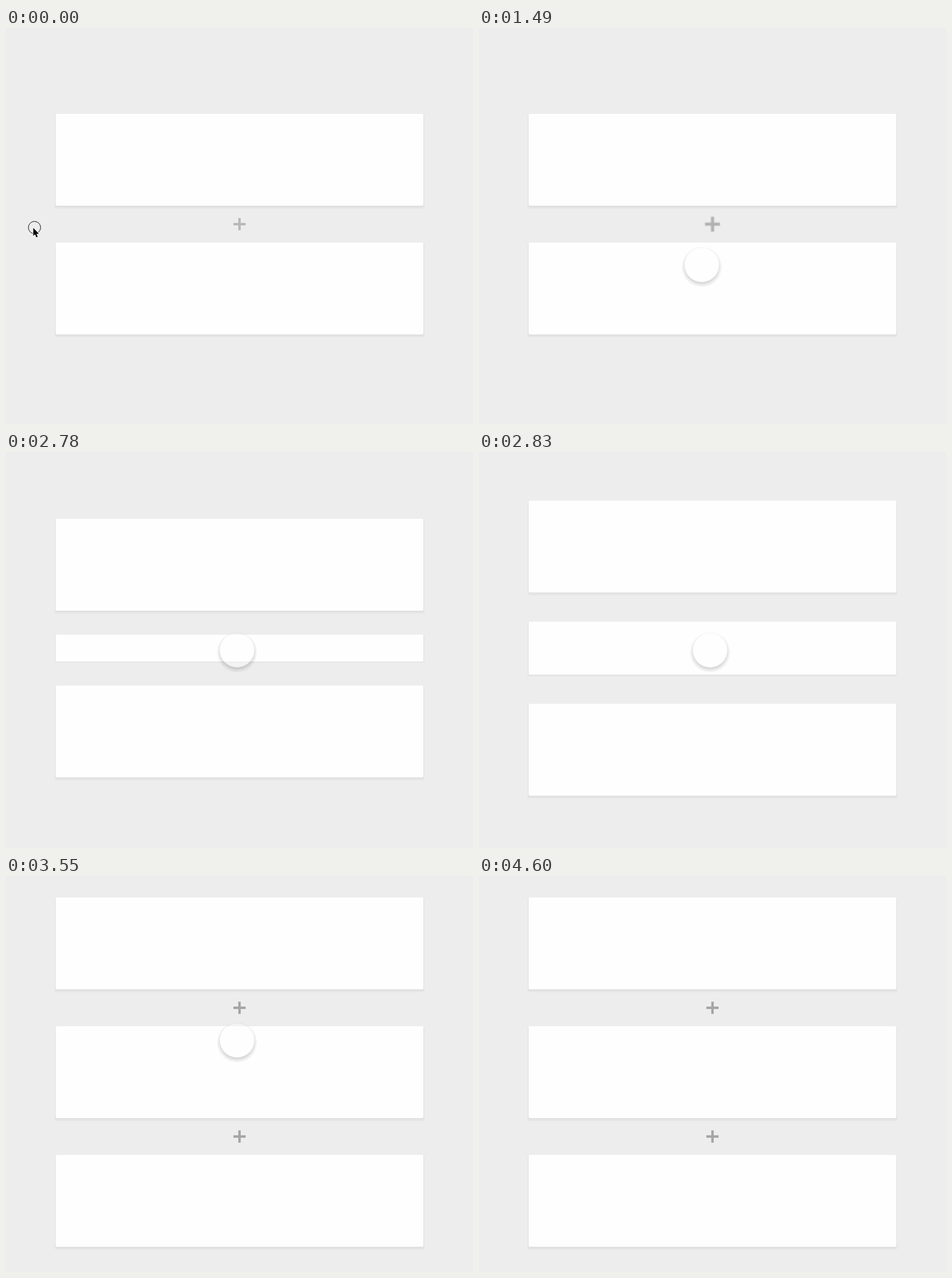
Recreate the animation shown at these times as an HTML page. Size 762x646 px, loop 5.1 s.

```html
<!DOCTYPE html>
<html lang="en">
<head>
<meta charset="utf-8">
<title>Insert a card</title>
<style>
  html, body { margin: 0; width: 100%; height: 100%; overflow: hidden; background: #ededed; }
  .stage { position: relative; width: 762px; height: 646px; overflow: hidden; }
  .stage * { position: absolute; animation: 5100ms linear infinite; }

  .card {
    left: 81px; width: 600px; height: 150px;
    border-radius: 2px; background: #fefefe;
    box-shadow: 0 0 1px rgba(0, 0, 0, .06), 0 1px 2px rgba(0, 0, 0, .06),
                0 3px 1px 1.5px rgba(0, 0, 0, .035);
  }
  .upper { top: 140px; animation-name: rise; }
  .middle { top: 245px; animation-name: unfold; }
  .lower { top: 350px; animation-name: sink; }

  .plus {
    left: 371px; width: 20px; height: 20px; background: #a6a6a6;
    clip-path: polygon(40% 0, 60% 0, 60% 40%, 100% 40%, 100% 60%, 60% 60%,
                       60% 100%, 40% 100%, 40% 60%, 0 60%, 0 40%, 40% 40%);
  }
  .hovered { top: 310px; animation-name: hover; }
  .fresh { animation-name: pop; }
  .first { top: 205px; }
  .second { top: 415px; }

  .track-x { left: 0; top: 0; animation-name: move-x; }
  .track-y { left: 0; top: 0; animation-name: move-y; }
  .touch {
    left: -28px; top: -28px; width: 56px; height: 56px;
    border-radius: 50%; background: rgba(255, 255, 255, .32);
    box-shadow: 0 3px 5px rgba(0, 0, 0, .17), 0 3.5px 1px 4.5px rgba(0, 0, 0, .04);
    animation-name: appear;
  }
  .cursor { left: 30px; top: 310px; animation-name: vanish; }

  @keyframes rise {
    from, 52.35% { transform: none; animation-timing-function: ease-in-out; }
    58.14%, to { transform: translateY(-105px); }
  }
  @keyframes sink {
    from, 52.35% { transform: none; animation-timing-function: ease-in-out; }
    58.14%, to { transform: translateY(105px); }
  }
  @keyframes unfold {
    from, 52.35% { transform: scaleY(0); animation-timing-function: ease-in-out; }
    58.14%, to { transform: none; }
  }
  @keyframes hover {
    from, 12.2%, 31%, 41.8% { transform: scale(1); background: #b9b9b9; animation-timing-function: ease-in-out; }
    15.9%, 27.5%, 45.1%, 50.8% { transform: scale(1.5); background: #a9a9a9; animation-timing-function: ease-in-out; }
    52.5%, to { transform: scale(0); background: #a9a9a9; }
  }
  @keyframes pop {
    from, 58.2% { transform: scale(0); animation-timing-function: cubic-bezier(.33, 1.87, .67, 1); }
    65.06%, to { transform: scale(1); }
  }
  @keyframes move-x {
    from, 10.8% { transform: translateX(45px); animation-timing-function: cubic-bezier(.215, .61, .355, 1); }
    22.16%, 26.3% { transform: translateX(360px); }
    31.4%, 38% { transform: translateX(366px); animation-timing-function: cubic-bezier(.215, .61, .355, 1); }
    47.45%, 78.24% { transform: translateX(377px); animation-timing-function: cubic-bezier(.32, 0, .67, 0); }
    89.02%, to { transform: translateX(680px); }
  }
  @keyframes move-y {
    from, 10.8% { transform: translateY(326px); animation-timing-function: ease-out; }
    16.47% { transform: translateY(341px); animation-timing-function: ease-in-out; }
    22.16%, 26.3% { transform: translateY(330px); animation-timing-function: ease-in-out; }
    31.4%, 38% { transform: translateY(420px); animation-timing-function: cubic-bezier(.215, .61, .355, 1); }
    47.45%, 63.7% { transform: translateY(323.5px); animation-timing-function: ease-in-out; }
    75.3%, 78.24% { transform: translateY(217px); animation-timing-function: cubic-bezier(.33, .15, .67, .6); }
    89.02%, to { transform: translateY(667px); }
  }
  @keyframes appear {
    from, 1.17% { opacity: 0; }
    7.2% { opacity: 1; }
    90.19% { opacity: 1; animation-timing-function: step-start; }
    90.2%, to { opacity: 0; }
  }
  @keyframes vanish {
    from, 1.17% { opacity: 1; }
    2.4%, to { opacity: 0; }
  }
</style>
</head>
<body>
<div class="stage">
  <div class="plus hovered"></div>
  <div class="plus fresh first"></div>
  <div class="plus fresh second"></div>
  <div class="card upper"></div>
  <div class="card middle"></div>
  <div class="card lower"></div>
  <div class="track-x"><div class="track-y"><div class="touch"></div></div></div>
  <svg class="cursor" width="36" height="36" viewBox="30 310 36 36">
    <circle cx="46.5" cy="325.5" r="10" fill="none" stroke="#111"/>
    <path d="M44.8 328v12l2.7-2.5 2 4.6 2-.9-2-4.4h3.8z" fill="#000" opacity=".2"/>
    <path d="M44.5 326v13.3l2.9-2.7 2 4.8 2.3-1-2-4.6h4z" fill="#000" stroke="#fff" stroke-width="1.6" paint-order="stroke"/>
  </svg>
</div>
</body>
</html>
```
